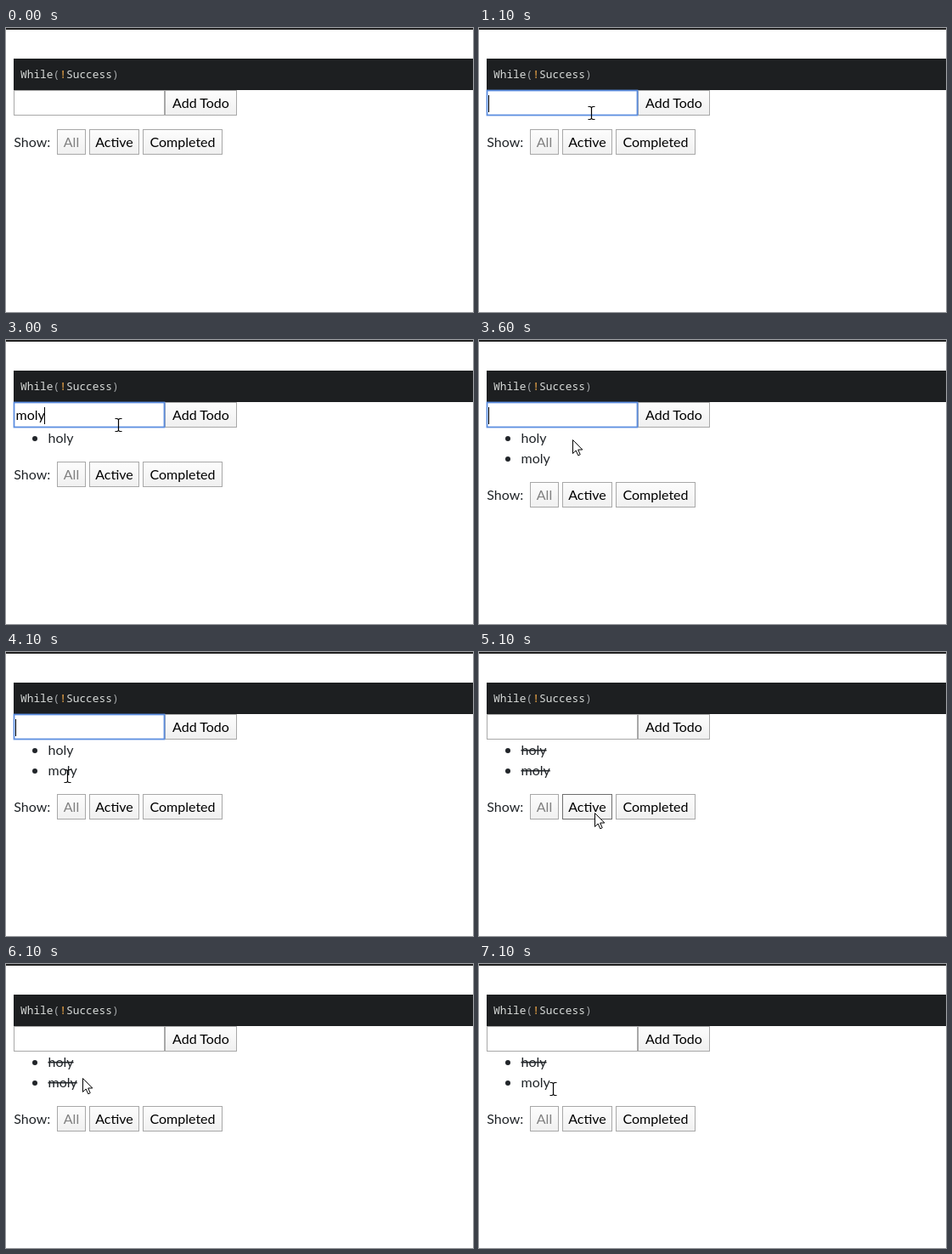
Write an HTML page that moves like this. It is 550x334 px and loops after 7200 ms.

```html
<!DOCTYPE html>
<html lang="en">
<head>
<meta charset="utf-8">
<title>Todo demo</title>
<style>
  html, body { margin: 0; width: 100%; height: 100%; overflow: hidden; background: #fff; }
  svg { display: block; font: 16px Lato, "Open Sans", sans-serif; fill: #212529; }
  .code { font: 12.85px "Noto Sans Mono", "DejaVu Sans Mono", monospace; fill: #d9dcda; white-space: pre; }
  .paren { fill: #a3a6a8; }
  .op { fill: #f0a848; }
  .field { fill: #fff; stroke: #a9a9a9; }
  .field.focus { stroke: #5c8ee0; stroke-width: 1.8; }
  .btn rect { fill: url(#face); stroke: #a8a8a8; }
  .btn text { fill: #000; text-anchor: middle; }
  .btn.hover rect { stroke: #6e6e6e; }
  .btn.off text { fill: #808080; }
  .done text { text-decoration: line-through; }
  .typed { fill: #000; }
</style>
</head>
<body>
<svg width="550" height="334" viewBox="0 0 550 334">
  <defs>
    <linearGradient id="face" x2="0" y2="1">
      <stop offset="0" stop-color="#fdfdfd"/>
      <stop offset="1" stop-color="#f0f0f0"/>
    </linearGradient>
  </defs>
  <rect width="550" height="2" fill="#222"/>
  <rect x="9" y="36" width="541" height="37" fill="#1d1f21"/>
  <text class="code" x="17" y="59">While<tspan class="paren">(</tspan><tspan class="op">!</tspan>Success<tspan class="paren">)</tspan></text>

  <g class="btn"><rect x="187.5" y="73.5" width="84" height="29"/><text x="229.5" y="94">Add Todo</text></g>
  <rect id="field" class="field" x="9.5" y="73.5" width="177" height="29"/>
  <text id="typed" class="typed" x="11.5" y="94"></text>
  <rect id="caret" y="79" width="1" height="20" fill="#000"/>

  <g class="item"><circle cx="34" cy="116" r="3"/><text x="49.5" y="121">holy</text></g>
  <g class="item"><circle cx="34" cy="140" r="3"/><text x="49.5" y="145">moly</text></g>

  <g id="row">
    <text x="9.3" y="21">Show:</text>
    <g class="btn filter"><rect x="60.5" y=".5" width="33" height="29"/><text x="77" y="21">All</text></g>
    <g class="btn filter"><rect x="98.5" y=".5" width="58" height="29"/><text x="127.5" y="21">Active</text></g>
    <g class="btn filter"><rect x="161.5" y=".5" width="93" height="29"/><text x="208" y="21">Completed</text></g>
  </g>

  <path id="arrow" d="M.5 .5V16.5L4.2 13L6.8 18.8L9.2 17.7L6.7 12H11.8Z" fill="#fff" stroke="#000"/>
  <path id="beam" d="M-3.5 -7.5H-1L.5 -6.5L2 -7.5H4.5M.5 -6.5V6.5M-3.5 7.5H-1L.5 6.5L2 7.5H4.5" fill="none" stroke="#000" stroke-width="1.2"/>
</svg>
<script>
  const LOOP = 7200, STEP = 100, BLINK = 450, LINE = 24;
  const ALL = 0, ACTIVE = 1, COMPLETED = 2;
  const ENTRY = 100, FOCUS = 800, BLUR = 4200;
  const $ = id => document.getElementById(id);
  const all = sel => [...document.querySelectorAll(sel)];
  const items = all('.item'), filters = all('.filter');

  // typed from start, one letter per gap, then added and ticked
  const todos = [
    { word: 'holy', start: 1800, gap: 100, enter: 2300, done: 4500, undone: LOOP },
    { word: 'moly', start: 2500, gap: 166, enter: 3200, done: BLUR, undone: 6500 }
  ];

  const entry = { x: 385, y: 228 };
  const moves = [
    { from: ENTRY, to: 900, x: 132, y: 100 },
    { from: 3500, to: 4000, x: 72, y: 146 },
    { from: 4300, to: 4500, x: 72, y: 118 },
    { from: 4600, to: 5100, x: 136, y: 189 },
    { from: 5200, to: 5500, x: 196, y: 136 },
    { from: 5600, to: 5800, x: 80, y: 188 },
    { from: 5900, to: 6100, x: 90, y: 134 },
    { from: 6200, to: 7100, x: 87, y: 147 }
  ];

  const within = (t, a, b) => t >= a && t < b;
  const show = (el, on) => el.setAttribute('visibility', on ? 'visible' : 'hidden');
  const easeOut = k => 1 - (1 - k) ** 2;

  function pointer(t) {
    let { x, y } = entry;
    for (const m of moves) {
      const k = easeOut(Math.min(1, Math.max(0, (t - m.from) / (m.to - m.from))));
      x += (m.x - x) * k;
      y += (m.y - y) * k;
    }
    return [Math.round(x), Math.round(y)];
  }

  // text in the field and the time of the latest key
  function typing(t) {
    let text = '', key = FOCUS;
    for (const { word, start, gap, enter } of todos) {
      if (t < start) break;
      const n = Math.min(word.length, Math.floor((t - start) / gap) + 1);
      text = t < enter ? word.slice(0, n) : '';
      key = t < enter ? start + (n - 1) * gap : enter;
    }
    return { text, key };
  }

  function filterAt(t) {
    if (within(t, 5200, 5600)) return ACTIVE;
    return within(t, 5600, 5900) ? COMPLETED : ALL;
  }

  function drawField(t) {
    const { text, key } = typing(t);
    const focus = within(t, FOCUS, BLUR);
    $('field').classList.toggle('focus', focus);
    $('typed').textContent = text;
    $('caret').setAttribute('x', Math.round(11 + $('typed').getComputedTextLength()));
    show($('caret'), focus && (t - key) % (2 * BLINK) < BLINK);
  }

  function drawItems(t, mode) {
    let count = 0;
    todos.forEach((todo, i) => {
      const done = within(t, todo.done, todo.undone);
      const seen = t >= todo.enter && (mode === ALL || done === (mode === COMPLETED));
      items[i].classList.toggle('done', done);
      show(items[i], seen);
      count += seen;
    });
    return count;
  }

  function drawPointer(t, x, y, count) {
    const onField = within(x, 9, 187) && within(y, 73, 103);
    const onItem = within(x, 50, 89) && within(y, 107, 107 + LINE * count);
    const text = onField || onItem;
    show($('beam'), t >= ENTRY && text);
    show($('arrow'), t >= ENTRY && !text);
    $(text ? 'beam' : 'arrow').setAttribute('transform', `translate(${x} ${y})`);
  }

  function drawFilters(mode, x, y, top) {
    $('row').setAttribute('transform', `translate(0 ${top})`);
    filters.forEach((el, i) => {
      const box = el.firstChild.getBBox();
      const over = within(x, box.x, box.x + box.width) && within(y, top, top + 30);
      el.classList.toggle('off', i === mode);
      el.classList.toggle('hover', over && i !== mode);
    });
  }

  function draw(t) {
    const mode = filterAt(t);
    const [x, y] = pointer(t);
    const count = drawItems(t, mode);
    drawField(t);
    drawFilters(mode, x, y, 119 + LINE * count);
    drawPointer(t, x, y, count);
  }

  const start = performance.now();
  function tick() {
    const t = (performance.now() - start) % LOOP;
    draw(Math.floor(t / STEP) * STEP);
    requestAnimationFrame(tick);
  }
  tick();
</script>
</body>
</html>
```
